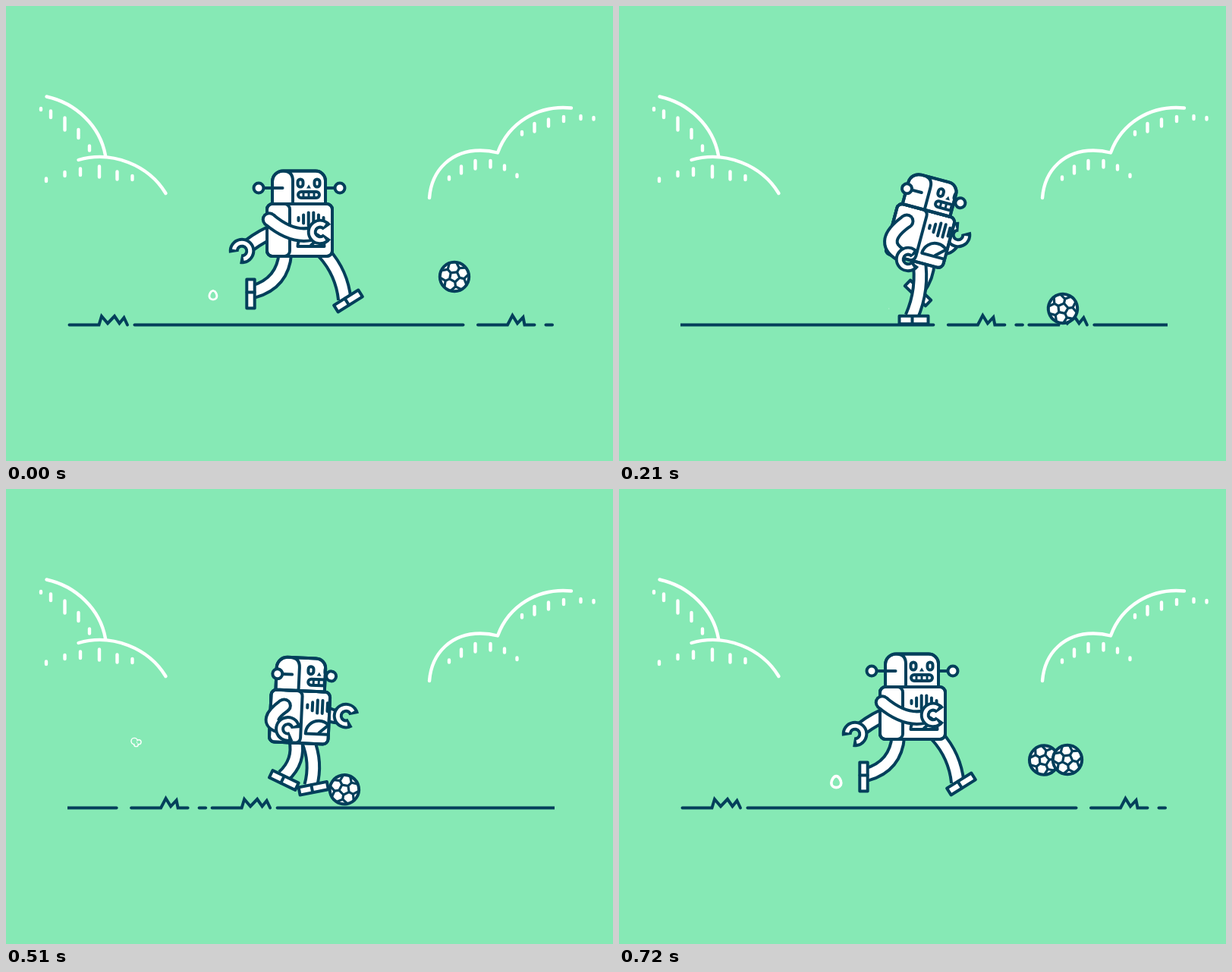
An HTML page with a canvas that plays this animation: 800 by 600 pixels, repeating every 750 ms.

```html
<!DOCTYPE html>
<html lang="en">
<head>
<meta charset="utf-8">
<title>Robot football</title>
<style>
html, body { margin: 0; width: 100%; height: 100%; overflow: hidden; background: #86e9b5; }
canvas { display: block; }
</style>
</head>
<body>
<canvas id="stage" width="800" height="600"></canvas>
<script>
const ctx = document.getElementById('stage').getContext('2d');
const GREEN = '#86e9b5', NAVY = '#033f5b', WHITE = '#fff';
const LOOP = 750, STEP = 30, CYCLE = 24, GROUND_PERIOD = 645;
const { PI, sin, cos, hypot, min } = Math;
const rad = deg => deg * PI / 180;

// Key poses: time first, then the values of the part
const BODY = [ // x, y, tilt, turn
  [0, 387, 295.5, 0, 0], [2, 391, 297, 6, 3], [7, 397, 303, 15, 10.5],
  [10, 390, 297, 4, 12.8], [14, 383.5, 296.5, -3, 15], [20, 391, 303.5, 8, 6]];
const NEAR_LEG = [ // hip, bend, foot x, foot y, foot angle
  [0, 32, 11, 451, 389, -32], [2, 28, 9, 439, 397, -25], [7, 6, 11.5, 388.5, 414, 0],
  [10, -9.5, 20, 350, 397, 33], [14, -13.4, 26, 330, 379, 72], [20, 9, 4, 411.5, 391.5, -27]];
const FAR_LEG = [
  [0, -19, 23, 322.5, 379.5, 90], [2, -15, 23, 343.5, 378.5, 94], [7, 19, 6, 394, 378.5, 44],
  [10, 26, 7, 427, 375, -2], [14, 25.5, 9, 434.5, 378, -28], [20, -4, 13, 368, 407, 20]];
const NEAR_ARM = [ // bend, hand x, hand y, claw direction
  [0, -17, 414, 298, 0], [2, -18, 419, 309, 8], [7, -38, 381, 334, 0],
  [10, -22, 346, 336, 90], [14, -22, 339, 339, 80], [20, -36, 406, 294, -15]];
const FAR_ARM = [
  [0, -14, 311, 323, 135], [2, -10, 338, 321, 130], [7, -33, 447, 302, -50],
  [10, -10, 485, 296, 0], [14, -6, 483, 301, 0], [20, -10, 400, 300, 60]];
const BALL_IN = [ // x, y
  [0, 591, 357], [2, 590, 363], [7, 585, 399], [8.5, 577.5, 407], [10, 567, 404],
  [14, 508, 382], [18, 424, 402], [19, 400, 404], [23, 591, 357]];

// Cyclic cubic interpolation through the key poses
function pose(keys, f) {
  f %= CYCLE;
  const n = keys.length;
  const at = i => {
    const k = keys[(i + n) % n].slice();
    k[0] += CYCLE * Math.floor(i / n);
    return k;
  };
  let i = n - 1;
  while (keys[i][0] > f) i--;
  const [a, b, c, d] = [i - 1, i, i + 1, i + 2].map(at);
  const h = c[0] - b[0], u = (f - b[0]) / h;
  return b.slice(1).map((p, j) => {
    j++;
    const q = c[j];
    const m = (q - a[j]) / (c[0] - a[0]) * h, k = (d[j] - p) / (d[0] - b[0]) * h;
    return p + u * (m + u * (3 * (q - p) - 2 * m - k + u * (2 * (p - q) + m + k)));
  });
}

function stroke(color, width) {
  ctx.strokeStyle = color;
  ctx.lineWidth = width;
  ctx.stroke();
}

function shape(draw, fill = WHITE) {
  ctx.beginPath();
  draw();
  ctx.fillStyle = fill;
  ctx.fill();
  stroke(NAVY, 4);
}

function line(color, width, ...points) {
  ctx.beginPath();
  points.forEach(([x, y], i) => i ? ctx.lineTo(x, y) : ctx.moveTo(x, y));
  stroke(color, width);
}

function disc(x, y, r, color) {
  ctx.beginPath();
  ctx.arc(x, y, r, 0, 2 * PI);
  ctx.fillStyle = color;
  ctx.fill();
}

function placed(x, y, angle, draw) {
  ctx.save();
  ctx.translate(x, y);
  ctx.rotate(angle);
  draw();
  ctx.restore();
}

function clipped(path, draw) {
  ctx.save();
  ctx.beginPath();
  path();
  ctx.clip();
  draw();
  ctx.restore();
}

// Bent tube from a to b, stopping short of b
function limb([ax, ay], [bx, by], bend, short = 0) {
  const dx = bx - ax, dy = by - ay, len = hypot(dx, dy) || 1;
  const qx = (ax + bx) / 2 + dy / len * bend, qy = (ay + by) / 2 - dx / len * bend;
  const end = hypot(bx - qx, by - qy) || 1;
  const ex = bx - (bx - qx) / end * short, ey = by - (by - qy) / end * short;
  ctx.lineCap = 'butt';
  for (const [color, width] of [[NAVY, 20.5], [WHITE, 12.5]]) {
    ctx.beginPath();
    ctx.moveTo(ax, ay);
    ctx.quadraticCurveTo(qx, qy, ex, ey);
    stroke(color, width);
    disc(ax, ay, width / 2, color);
  }
  ctx.lineCap = 'round';
}

function arm(shoulder, [bend, x, y, direction]) {
  limb(shoulder, [x, y], bend, 12);
  placed(x, y, rad(direction), () => {
    ctx.lineCap = 'butt';
    for (const [color, width, gap] of [[NAVY, 13, 0.62], [WHITE, 5, 0.98]]) {
      ctx.beginPath();
      ctx.arc(0, 0, 10.8, gap, 2 * PI - gap);
      stroke(color, width);
    }
    ctx.lineCap = 'round';
  });
}

function leg(local, [hip, bend, x, y, angle]) {
  const a = rad(angle);
  const ankle = [x - 3 * cos(a) + 4 * sin(a), y - 3 * sin(a) - 4 * cos(a)];
  limb(local(hip, 30), ankle, bend);
  placed(x, y, a, () => {
    shape(() => ctx.rect(-19, -5.2, 38, 10.4));
    line(NAVY, 4, [-2, -5], [-2, 5]);
  });
}

function torso(turn) {
  const w = 86 - 0.75 * turn, side = 30 + turn, x = -w / 2;
  const box = () => ctx.roundRect(x, -34.5, w, 69, 7);
  shape(box);
  clipped(box, () => {
    [2, 5.5, 8.5, 8.5, 5.5, 2].forEach((h, i) => {
      const bx = -1.5 + turn + 6.6 * i;
      line(NAVY, 4, [bx, -14.5 - h], [bx, -14.5 + h]);
    });
    const gx = 15 + turn;
    shape(() => { ctx.arc(gx, 21.5, 17.5, PI, 2 * PI); ctx.closePath(); });
    line(NAVY, 4, [gx, 20], [gx + 10, 11]);
  });
  shape(() => ctx.roundRect(x, -34.5, side, 69, 7));
  ctx.beginPath();
  box();
  stroke(NAVY, 4);
}

function head(turn) {
  const w = 70 - 0.5 * turn, x = -1 - w / 2, edge = x + w, seam = x + 27 + 0.28 * turn;
  const box = () => ctx.roundRect(x, -78, w, 43.5, [14, 13, 0, 0]);
  shape(box);
  clipped(box, () => {
    for (const ex of [1, 23]) shape(() => ctx.roundRect(ex + turn - 3.5, -67, 7, 10, 3.5));
    const m = 12 + turn;
    ctx.beginPath();
    ctx.moveTo(m, -60);
    ctx.lineTo(m + 3, -55);
    ctx.lineTo(m - 3, -55);
    ctx.closePath();
    ctx.fillStyle = NAVY;
    ctx.fill();
    shape(() => ctx.roundRect(m - 14, -50.5, 28, 8, 4));
    for (const tooth of [-7, 0, 7]) line(NAVY, 3, [m + tooth, -49], [m + tooth, -44]);
  });
  ctx.beginPath();
  box();
  ctx.moveTo(seam, -34.5);
  ctx.lineTo(seam, -65);
  ctx.quadraticCurveTo(seam, -78, seam - 13, -78);
  stroke(NAVY, 4);

  const left = -54 + 2 * turn, right = 53 - 1.25 * turn, y = -55.5;
  line(NAVY, 4, [left, y], [-22.5 + 0.9 * turn, y]);
  if (right > edge) line(NAVY, 4, [edge, y], [right, y]);
  for (const bx of [left, right]) shape(() => ctx.arc(bx, y, 6.5, 0, 2 * PI));
}

function robot(f) {
  const [x, y, tilt, turn] = pose(BODY, f), a = rad(tilt);
  const local = (u, v) => [x + u * cos(a) - v * sin(a), y + u * sin(a) + v * cos(a)];
  arm(local(22, -14), pose(FAR_ARM, f));
  leg(local, pose(FAR_LEG, f));
  leg(local, pose(NEAR_LEG, f));
  placed(x, y, a, () => { torso(turn); head(turn); });
  arm(local(-40 + 1.7 * turn, -14), pose(NEAR_ARM, f));
}

function ballAt(f) {
  if (f <= 18) return pose(BALL_IN, f);
  const u = (f - 18) / 6;
  return [424 + 167 * u ** 1.12, min(402, 357 + 68.7 * (1 - u) ** 2.7)];
}

function ball(f) {
  const [x, y] = ballAt(f);
  placed(x, y, (x - 591) / 20, () => {
    shape(() => ctx.arc(0, 0, 19.2, 0, 2 * PI));
    const polar = (r, t) => [r * cos(t), r * sin(t)];
    const corners = [0, 1, 2, 3, 4].map(i => i * 2 * PI / 5 + 0.2);
    line(NAVY, 3.2, ...[...corners, corners[0]].map(t => polar(7, t)));
    for (const t of corners) {
      line(NAVY, 3.2, polar(7, t), polar(13, t));
      line(NAVY, 3.2, polar(18.5, t - 0.36), polar(13, t), polar(18.5, t + 0.36));
    }
  });
}

function ground(f) {
  clipped(() => ctx.rect(81, 380, 642, 60), () => {
    ctx.lineJoin = 'miter';
    for (const k of [0, 1]) {
      placed((k - f / CYCLE) * GROUND_PERIOD, 0, 0, () => {
        line(NAVY, 4, [83.5, 420.5], [122.5, 420.5], [126, 409], [134, 418.5], [143, 409],
          [149.5, 418.5], [155.5, 411], [160, 420.5]);
        line(NAVY, 4, [169.5, 420.5], [602.5, 420.5]);
        line(NAVY, 4, [622, 420.5], [661, 420.5], [667.5, 408], [674, 418.5], [681.5, 410.5],
          [683.5, 420.5], [696.5, 420.5]);
        line(NAVY, 4, [711.5, 420.5], [720, 420.5]);
      });
    }
    ctx.lineJoin = 'round';
  });
}

function puffs(f) {
  let age = f - 6.9;
  if (age > 0 && age < 11.5) {
    placed(357 - 11.9 * age - 0.64 * age ** 2, 399 - 0.64 * age ** 2, 0, () => {
      const s = sin(PI * age / 11.5) * 1.06;
      ctx.scale(s, s);
      for (const [grow, color] of [[1.8, WHITE], [-1.8, GREEN]]) {
        disc(-6, -3, 10.5 + grow, color);
        disc(9, 0, 7.5 + grow, color);
        disc(0, 8, 7 + grow, color);
      }
    });
  }
  age = (f < 5 ? f + 25 : f) - 18.8;
  if (age > 0 && age < 8.3) {
    placed(356 - 13.4 * age, 398 - 0.43 * age ** 2, 0, () => {
      const s = sin(PI * age / 8.3);
      ctx.scale(s, s);
      ctx.beginPath();
      ctx.moveTo(0, -8.5);
      ctx.bezierCurveTo(4, -8.5, 7, -2, 7, 1.5);
      ctx.bezierCurveTo(7, 10, -7, 10, -7, 1.5);
      ctx.bezierCurveTo(-7, -2, -4, -8.5, 0, -8.5);
      stroke(WHITE, 4);
    });
  }
}

const HILLS = new Path2D('M53.500 119.500C92 128 124 158 131 197M95.500 203C140 190 188 210 210.500 247' +
  'M558 253C561 215 588 190.500 625 190.500Q637 190.500 648 193.500C662 155 700 130 745 134.500');
const DASHES = new Path2D('M46 135v2M59 138.500v8.500M77.500 147.500v16M95.500 163v11M110 184.500v6' +
  'M53 227.500v3.500M77.500 219v5M98 214.500v8.500M123 211.500v14M146.500 218.500v10M166.500 224v5' +
  'M584 225.500v3M600 211.500v9M618.500 204v10.500M638.500 204v8.500M657 210.500v5M673.500 222.500v2.500' +
  'M680 166v3.500M696.500 155v10.500M715 149.500v9M735 146v6M757.500 145v4M774.500 147v2.500');

function scenery() {
  ctx.strokeStyle = WHITE;
  ctx.lineWidth = 4.4;
  ctx.stroke(HILLS);
  ctx.stroke(DASHES);
}

function draw() {
  const f = Math.floor(performance.now() % LOOP / STEP);
  ctx.lineCap = ctx.lineJoin = 'round';
  ctx.fillStyle = GREEN;
  ctx.fillRect(0, 0, 800, 600);
  scenery();
  ground(f);
  puffs(f);
  if (f > 18) ball(f - 1);
  ball(f === CYCLE ? 0 : f);
  robot(f);
  requestAnimationFrame(draw);
}
draw();
</script>
</body>
</html>
```
